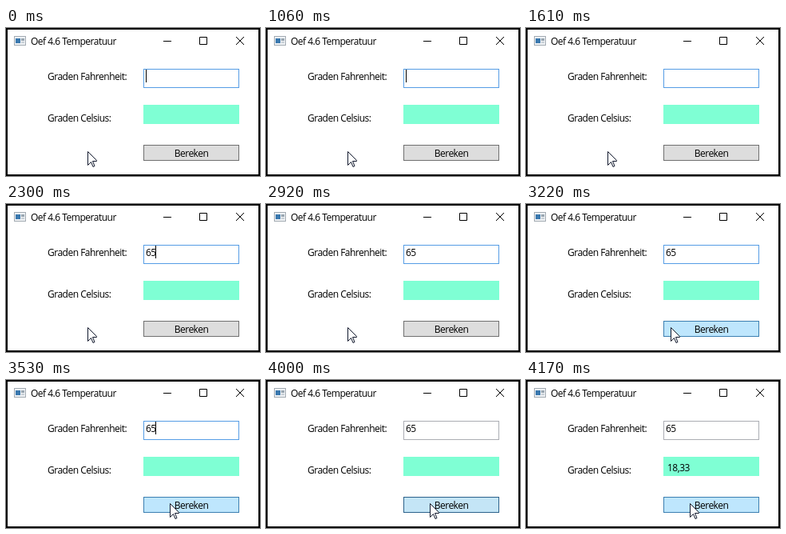
Recreate the animation shown at these times as an HTML page. Size 318 by 185 pixels, loop 6.41 s.

```html
<!DOCTYPE html>
<html lang="nl">
<head>
<meta charset="utf-8">
<title>Temperatuur</title>
<style>
html, body { margin: 0; width: 100%; height: 100%; overflow: hidden; background: #fff; }
svg { display: block; }
text { font: 12px "Open Sans", "Noto Sans", sans-serif; letter-spacing: -.5px; fill: #000; }
.crisp { shape-rendering: crispEdges; }
</style>
</head>
<body>
<svg width="318" height="185" viewBox="0 0 318 185">
  <rect width="318" height="185"/>
  <rect x="2" y="2" width="314" height="181" fill="#fff"/>

  <!-- title bar -->
  <g class="crisp">
    <rect x="10.5" y="10.5" width="14" height="11" fill="#eef1f4" stroke="#a3abb2"/>
    <rect x="12" y="13" width="6" height="6" fill="#3a78ae"/>
    <rect x="19" y="13" width="4" height="3" fill="#9aa7b1"/>
    <rect x="19" y="17" width="4" height="2" fill="#c8d0d6"/>
  </g>
  <text x="31" y="21">Oef 4.6 Temperatuur</text>
  <g fill="none" stroke="#000">
    <path d="M197 16.5h10M242.5 11.5h9v9h-9z"/>
    <path d="M288 11l10 10M298 11l-10 10"/>
  </g>

  <!-- form -->
  <text x="52" y="65">Graden Fahrenheit:</text>
  <text x="52" y="117">Graden Celsius:</text>
  <rect id="box" class="crisp" x="172.5" y="51.5" width="119" height="23" fill="#fff"/>
  <text id="input" x="175" y="65"></text>
  <rect id="caret" class="crisp" y="52" width="1" height="16"/>
  <rect class="crisp" x="172" y="96" width="120" height="24" fill="#7fffd4"/>
  <text id="result" x="177" y="114">18,33</text>
  <rect id="button" class="crisp" x="172.5" y="146.5" width="119" height="19"/>
  <text x="232" y="161" text-anchor="middle">Bereken</text>

  <path id="mouse" d="M.5.5v17l4-4 2.5 6 2-1-2.5-6h5v-1z" fill="#fff" stroke="#10182c"/>
</svg>
<script>
const LOOP = 6410, PRESS = 4000, RELEASE = 4170;
const $ = id => document.getElementById(id);

// Each track lists [start time, value]; a value holds until the next start.
const typed = [[0, ""], [1830, "6"], [2300, "65"]];
const caretOn = [[0, 1], [520, 0], [1060, 1], [1610, 0], [1830, 1], [2920, 0], [3390, 1], [3840, 0]];
const mouseX = [[0, 102], [3000, 107], [3060, 128], [3140, 157], [3220, 181], [3300, 197], [3390, 204], [3530, 205]];
const looks = {
  idle: ["#dddddd", "#707070"],
  hover: ["#bee6fd", "#3c7fb1"],
  pressed: ["#c4e5f6", "#2c628b"]
};

const at = (track, t) => track.findLast(step => step[0] <= t)[1];

function draw(now) {
  const t = now % LOOP, text = at(typed, t), x = at(mouseX, t);
  const look = x < 172 ? "idle" : t >= PRESS && t < RELEASE ? "pressed" : "hover";
  const [fill, stroke] = looks[look];
  $("input").textContent = text;
  $("caret").setAttribute("x", 175 + 6 * text.length);
  $("caret").setAttribute("opacity", at(caretOn, t));
  $("box").setAttribute("stroke", t < PRESS ? "#569de5" : "#abadb3");
  $("result").setAttribute("opacity", t < RELEASE ? 0 : 1);
  $("button").setAttribute("fill", fill);
  $("button").setAttribute("stroke", stroke);
  $("mouse").setAttribute("transform", `translate(${x} 154)`);
}

const start = performance.now();
function tick() {
  draw(performance.now() - start);
  requestAnimationFrame(tick);
}
tick();
</script>
</body>
</html>
```
